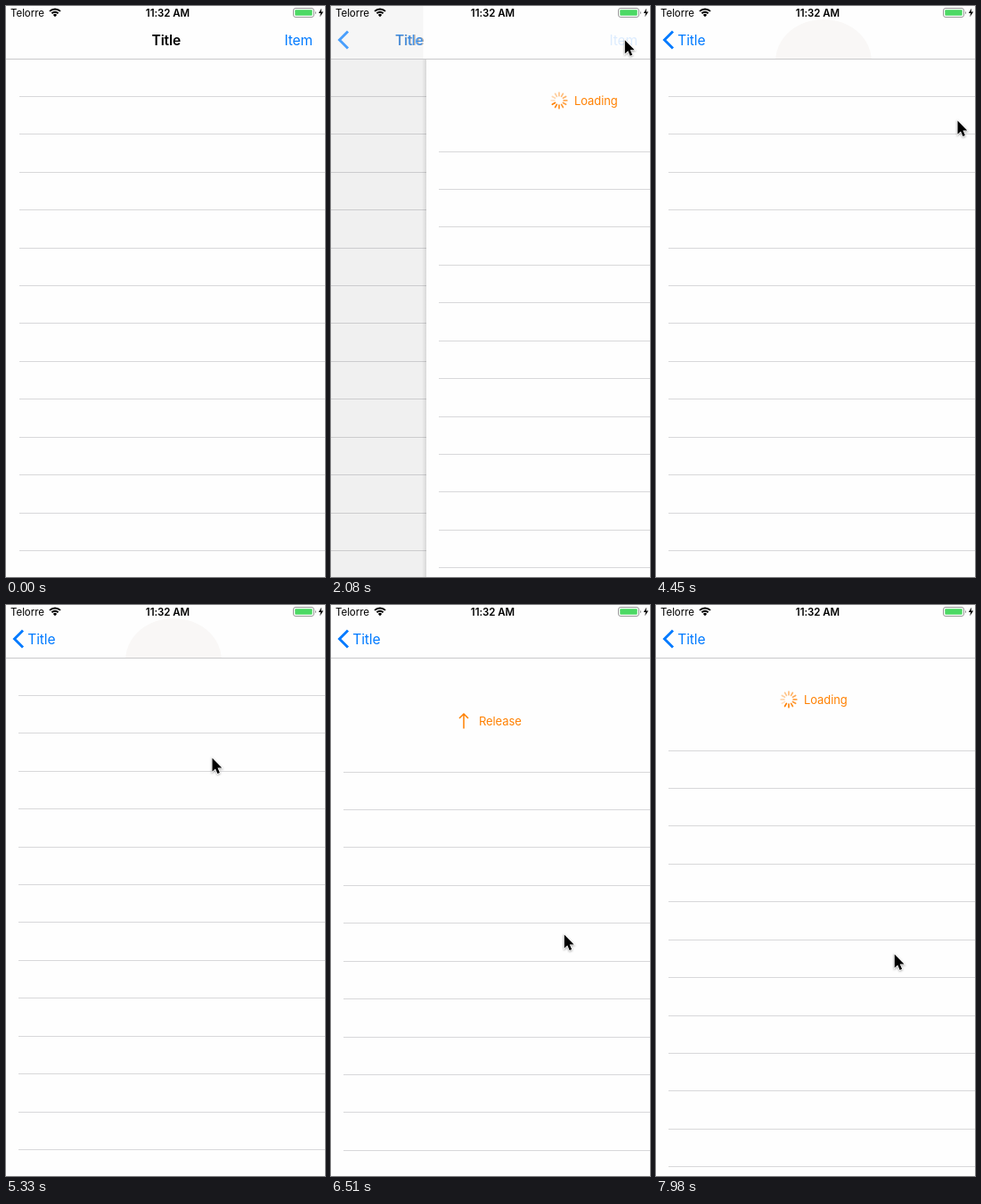
Recreate the animation shown at these times as an HTML page. Size 358 by 640 pixels, loop 8000 ms.

```html
<!DOCTYPE html>
<html lang="en">
<head>
<meta charset="utf-8">
<title>Pull to refresh</title>
<style>
html, body { margin: 0; width: 100%; height: 100%; overflow: hidden; background: #fefefe; }
svg { display: block; width: 358px; height: 640px; font-family: Inter, Roboto, sans-serif; }
.bar { font-size: 15.6px; letter-spacing: -.15px; fill: #007aff; }
.bold { font-weight: 600; fill: #000; }
.status { font-size: 11.5px; letter-spacing: -.05px; }
.label { font-size: 13px; letter-spacing: -.1px; fill: #ff8000; }
.rules { fill: #d8d8da; shape-rendering: crispEdges; }
</style>
</head>
<body>
<svg viewBox="0 0 358 640">
  <defs>
    <linearGradient id="edge">
      <stop offset="0" stop-opacity="0"/><stop offset="1" stop-opacity=".1"/>
    </linearGradient>
    <clipPath id="navArea"><path d="M0 0H358V59H0Z"/></clipPath>
  </defs>
  <rect width="358" height="640" fill="#fefefe"/>

  <g id="home" class="rules"></g>
  <rect id="dim" width="358" height="640"/>

  <g id="detail">
    <rect x="-5" width="5" height="640" fill="url(#edge)"/>
    <rect width="358" height="640" fill="#fefefe"/>
    <g id="rows" class="rules"></g>
    <g id="header">
      <g id="spinner" stroke="#ff8000" stroke-width="1.7" stroke-linecap="round"></g>
      <path id="arrow" d="M0 -8.5V8M-5 3L0 8L5 3" fill="none" stroke="#ff8000" stroke-width="1.5"/>
      <text id="label" class="label" x="166" y="4.8"></text>
    </g>
  </g>

  <rect width="358" height="59" fill="#fefefe"/>
  <rect id="tint" height="59" fill="#f6f6f6"/>
  <g clip-path="url(#navArea)">
    <ellipse id="glow" cx="188" cy="62" rx="54" ry="47" fill="#f9f7f6"/>
  </g>
  <rect y="59" width="358" height="1" fill="#c9c9cb"/>
  <path id="back" d="M19 28.5L9.5 38L19 47.5" fill="none" stroke="#007aff" stroke-width="2.9"/>
  <g id="title">
    <text id="titleBold" class="bar bold" y="43.7">Title</text>
    <text id="titleBack" class="bar" y="43.7">Title</text>
  </g>
  <text id="item" class="bar" x="312.5" y="43.7">Item</text>

  <text class="status" x="5" y="11.6">Telorre</text>
  <text class="status bold" x="181.5" y="11.6" text-anchor="middle">11:32 AM</text>
  <g fill="none" stroke="#000" stroke-width="2">
    <path d="M49 5.9A8.6 8.6 0 0 1 61 5.9M51.4 8.3A5.2 5.2 0 0 1 58.6 8.3"/>
    <path d="M55 12.2L52.9 9.9A3 3 0 0 1 57.1 9.9Z" fill="#000" stroke="none"/>
  </g>
  <rect x="322.5" y="2.5" width="23" height="10" rx="2.5" fill="none" stroke="#999"/>
  <rect x="324.3" y="4.2" width="19.4" height="6.6" rx="1" fill="#4cd964"/>
  <path d="M347 5.7Q349 7.5 347 9.3Z" fill="#888"/>
  <path d="M354.2 2.6L350.8 8H353.2L352.2 12.2L356.2 6.5H353.6Z"/>

  <path id="cursor" d="M0 0V15.2L3.5 12L5.9 17.5L8.4 16.4L6 11H10.8Z"
    stroke="#fff" stroke-width="1.6" paint-order="stroke" style="filter:drop-shadow(0 1px 1px #0005)"/>
</svg>

<script>
const LOOP = 8000, START = 1050, STEP = 147.4, REST = 61.7;
const $ = id => document.getElementById(id);
const set = (id, name, value) => $(id).setAttribute(name, value);
const move = (id, x, y, angle = 0) => set(id, 'transform', `translate(${x} ${y}) rotate(${angle})`);
const clamp = v => Math.max(0, Math.min(1, v));
const mix = (a, b, p) => a + (b - a) * p;

// Piecewise linear value through [step, value] points
function track(points, k) {
  const i = points.findIndex(p => p[0] > k);
  if (i < 0) return points[points.length - 1][1];
  if (i === 0) return points[0][1];
  const [a, va] = points[i - 1], [b, vb] = points[i];
  return mix(va, vb, (k - a) / (b - a));
}

const cursorX = [[0, 344], [4, 329.8], [15, 329.8], [21, 338.5], [23, 338.5], [26, 231.5],
  [29, 231.5], [32, 241.5], [37, 261.8], [40, 267.7]];
const cursorY = [[0, 16.5], [4, 38.3], [15, 38.3], [21, 128.5], [23, 128.5], [26, 171.5],
  [29, 171.5], [32, 253], [37, 369.5], [40, 391.5]];
const pull = [[18, REST], [19, 46], [20, 16], [21, 0], [29, 0], [32, 36.6], [37, 85.8],
  [39, 93], [40, 76], [41, 64], [42, REST]];
const push = [[6, 0], [7, .7], [8, .96], [9, 1]];

function rules(id, left, offset) {
  let out = '';
  for (let i = 0; i < 13; i++)
    out += `<rect x="${left}" y="${Math.floor(101.3 + 42.43 * i + offset)}" width="358" height="1"/>`;
  $(id).innerHTML = out;
}

function drawSpinner(ms) {
  const head = Math.floor(8.5 + (ms - 2081) * .012);
  let out = '';
  for (let i = 0; i < 12; i++) {
    const age = ((head - i) % 12 + 12) % 12;
    out += `<path d="M0 -5.2V-8.8" transform="rotate(${i * 30})" opacity="${1 - age * .07}"/>`;
  }
  $('spinner').innerHTML = out;
}

function draw(t) {
  // The screen updates in fixed steps
  const k = Math.max(-1, Math.floor((t - START + 12) / STEP));
  const p = track(push, k), x = 358 * (1 - p), offset = track(pull, k);
  const loading = k < 21 || k >= 40;

  move('home', -75 / .7 * p, 0);
  set('dim', 'opacity', .08 * p);
  move('detail', Math.round(x), 0);
  set('detail', 'opacity', p > 0 ? 1 : 0);
  rules('rows', 14, offset);

  move('header', 0, 44.2 + offset);
  move('spinner', 149, 0);
  move('arrow', 149, 0, -180 * clamp((offset - 60) / 8));
  set('spinner', 'opacity', loading ? 1 : 0);
  set('arrow', 'opacity', loading ? 0 : 1);
  $('label').textContent = loading ? 'Loading' : offset > 62 ? 'Release' : 'Pull down';
  drawSpinner(START + k * STEP);

  set('tint', 'width', p > 0 && p < 1 ? Math.max(0, x - 4) : 0);
  set('glow', 'opacity', p < 1 ? 0 : clamp(1 - offset / 20));
  move('title', mix(163.5, 24.3, p ** 1.18), 0);
  set('titleBold', 'opacity', 1 - p);
  set('titleBack', 'opacity', p);
  set('back', 'opacity', p);
  set('item', 'opacity', k < 5 ? 1 : k < 7 ? .25 : k < 8 ? .13 : 0);

  move('cursor', track(cursorX, k), track(cursorY, k));
  set('cursor', 'opacity', k < 0 ? 0 : 1);
}

rules('home', 15, 0);
const begin = performance.now();
function frame() {
  draw((performance.now() - begin) % LOOP);
  requestAnimationFrame(frame);
}
frame();
</script>
</body>
</html>
```
